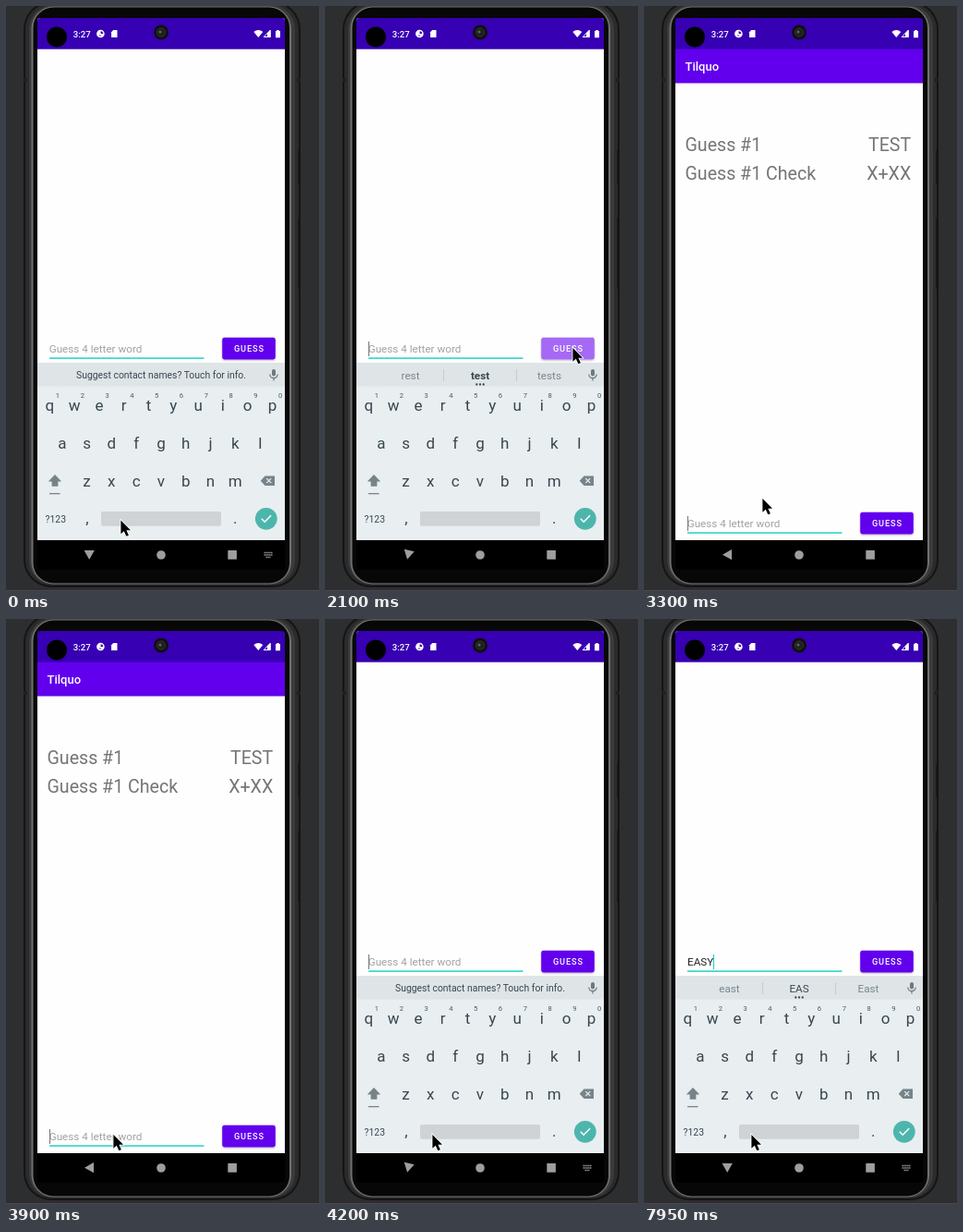
Recreate the animation shown at these times as an HTML page. Size 339 by 633 pixels, loop 8000 ms.

```html
<!DOCTYPE html>
<html lang="en">
<head>
<meta charset="utf-8">
<title>Word guessing game</title>
<style>
  html, body { margin: 0; width: 100%; height: 100%; overflow: hidden; background: #2d2e30; }
  svg { display: block; width: 339px; height: 633px; font-family: Roboto, "Noto Sans", sans-serif; }
  .mid { text-anchor: middle; }
  .key { font-size: 17px; fill: #37474f; text-anchor: middle; }
  .digit { font-size: 7.6px; fill: #455a64; text-anchor: middle; }
  .field { font-size: 11.7px; text-underline-offset: 1.6px; }
  .guess { font-size: 19.6px; fill: #757575; }
  .word { font-size: 11.7px; fill: #78868d; text-anchor: middle; }
</style>
</head>
<body>
<svg viewBox="0 0 339 633">
  <defs>
    <clipPath id="screen"><rect x="34" y="13" width="268" height="596.5" rx="3"/></clipPath>
    <filter id="shadow" x="-10%" y="-30%" width="120%" height="180%">
      <feDropShadow dx="0" dy=".9" stdDeviation=".8" flood-opacity=".3"/>
    </filter>
  </defs>

  <!-- phone body -->
  <rect width="339" height="633" fill="#2d2e30"/>
  <rect y="632" width="339" height="1" fill="#51434e"/>
  <rect x="19" y="-5" width="300" height="634" rx="30" fill="#151515"/>
  <rect x="21" y="-3" width="296" height="630" rx="28" fill="#2b2b2b"/>
  <rect x="25" y="-1" width="288" height="627" rx="26" fill="#3b3b3b"/>
  <rect x="27.5" y=".5" width="281.5" height="625" rx="24" fill="#707070"/>
  <rect x="29.5" y="1.5" width="277.5" height="623" rx="22" fill="#070707"/>
  <path d="M316.5 156h2.5v37h-2.5zM316.5 229h2.5v77h-2.5z" fill="#131313"/>
  <path d="M19 78h4v4h-4zM315 78h4v4h-4z" fill="#1f1f1f"/>

  <g clip-path="url(#screen)">
    <rect x="34" y="13" width="268" height="597" fill="#000"/>

    <g id="app">
      <rect x="34" y="47" width="268" height="531" fill="#fefefe"/>
      <rect x="34" y="46" width="268" height="37.5" fill="#6200ee"/>
      <text x="44.5" y="70" font-size="13" font-weight="500" fill="#fff">Tilquo</text>
      <g class="guess">
        <text x="44.5" y="156.5">Guess #1</text>
        <text x="289.2" y="156.5" text-anchor="end">TEST</text>
        <text x="44.5" y="188">Guess #1 Check</text>
        <text x="289.2" y="188" text-anchor="end">X+XX</text>
      </g>
      <text id="hint" class="field" x="46.7" y="564.3" fill="#a2a2a2">Guess 4 letter word</text>
      <text id="typed" class="field" x="47" y="564.3" fill="#222"></text>
      <rect id="caret" y="552" width="1" height="16"/>
      <rect x="47" y="569.4" width="167.5" height="1.4" fill="#14cfc2"/>
      <rect id="button" x="234.2" y="547.8" width="57.6" height="23.6" rx="2.4" filter="url(#shadow)"/>
      <text x="247" y="563.2" font-size="9.2" font-weight="500" letter-spacing=".85" fill="#fff">GUESS</text>
    </g>

    <!-- status bar -->
    <rect x="34" y="13" width="268" height="33.7" fill="#3700b3"/>
    <text x="72.7" y="33.5" font-size="9.6" font-weight="500" fill="#fff">3:27</text>
    <circle cx="102.4" cy="30" r="4.3" fill="#fff"/>
    <path d="M102.6 27.2a2.8 2.8 0 0 1 2.6 2.8h-2.6zM100.4 31.4h2.2v1.6z" fill="#3700b3"/>
    <path d="M116.2 26h4.3v8h-6.4v-5.8z" fill="#fff"/>
    <path d="M268.3 28q5-4 10 0l-5 6z" fill="#fff"/>
    <path d="M286.2 26.2v7.3h-7z" fill="none" stroke="#fff"/>
    <path d="M283 29.5l3.5-3.5v8H283z" fill="#fff"/>
    <path d="M292 27h1.3v-1h2.4v1h1.3v7.2h-5z" fill="#fff"/>

    <g id="keyboard">
      <rect x="34" y="386" width="268" height="192" fill="#e9eef1"/>
      <rect x="34" y="386" width="268" height="25.5" fill="#dfe4e7"/>
      <rect x="34" y="578" width="268" height="32" fill="#000"/>
      <text id="notice" class="mid" x="168" y="403.3" font-size="10.4" fill="#37474f">Suggest contact names? Touch for info.</text>
      <g id="words">
        <path d="M128.5 393v13M207.5 393v13" stroke="#c5ccd0"/>
        <text class="word" x="92.5" y="403.7"></text>
        <text class="word" x="168" y="403.7" style="fill:#37474f"></text>
        <text class="word" x="243" y="403.7"></text>
        <path d="M164.3 409.5h.01M168 409.5h.01M171.7 409.5h.01" stroke="#37474f" stroke-width="2.3" stroke-linecap="round"/>
      </g>
      <rect x="288" y="393" width="4" height="7.5" rx="2" fill="#6b7a81"/>
      <path d="M285.8 398.5a4.2 4.2 0 0 0 8.4 0M290 402.5v3" fill="none" stroke="#6b7a81" stroke-width="1.2"/>
      <g id="keys"></g>
      <path d="M53 507l7.2 7.5h-3.8v5.2h-6.8v-5.2h-3.8z" fill="#76848a"/>
      <rect x="47" y="527" width="11.5" height="1.3" fill="#76848a"/>
      <path d="M280.5 508.5h10.5v10.5h-10.5l-4.8-5.2z" fill="#76848a"/>
      <path d="M282.2 511.2l5 5m0-5l-5 5" stroke="#e9eef1" stroke-width="1.2"/>
      <text class="mid" x="53.8" y="558.7" font-size="10.4" fill="#37474f">?123</text>
      <rect x="103" y="547" width="130" height="15.7" rx="2" fill="#cfd3d5"/>
      <circle cx="281.8" cy="554.8" r="11.9" fill="#4db6ac"/>
      <path d="M276.8 554.8l3.4 3.4 6.9-6.9" fill="none" stroke="#fff" stroke-width="1.5"/>
    </g>

    <!-- navigation -->
    <g fill="#fff" fill-opacity=".62">
      <path id="back" d="M-5.6-4.8H5.6L0 5.2z"/>
      <circle cx="168" cy="594" r="4.8"/>
      <rect x="240.3" y="589" width="9.6" height="9.8" rx=".6"/>
      <path id="ime" d="M279.5 591.5h9M279.5 594h9M281.5 596.5h5" fill="none" stroke="#fff" stroke-opacity=".6" stroke-width="1.4" stroke-dasharray="1.4 .5"/>
    </g>
  </g>

  <circle cx="55" cy="33.5" r="11" fill="#000"/>
  <circle cx="168" cy="28.5" r="8" fill="#101012"/>
  <circle cx="168" cy="28.5" r="4.6" fill="#1d1f20" stroke="#34352f"/>
  <circle cx="167" cy="28" r="1.6" fill="#5a6158"/>

  <path id="mouse" d="M-.6 0V14.8L2.8 11.7 5.3 17.3 7.9 16.2 5.4 10.8H10z" fill="#000" stroke="#fff" stroke-width="1.6" paint-order="stroke"/>
</svg>
<script>
const LOOP = 8000;
const $ = id => document.getElementById(id);

function addKey(cls, x, y, label) {
  const node = document.createElementNS("http://www.w3.org/2000/svg", "text");
  node.setAttribute("class", cls);
  node.setAttribute("x", x);
  node.setAttribute("y", y);
  node.textContent = label;
  $("keys").append(node);
}
function addRow(cls, x, y, labels) {
  [...labels].forEach((label, i) => addKey(cls, x + 26.8 * i, y, label));
}
addRow("key", 47.3, 438, "qwertyuiop");
addRow("digit", 56, 423.5, "1234567890");
addRow("key", 60.8, 479, "asdfghjkl");
addRow("key", 87.5, 520, "zxcvbnm");
addKey("key", 88, 560, ",");
addKey("key", 248.3, 560, ".");

// pan: content shift; drop, fade: keyboard offset and opacity; turn: back arrow angle
const START = {
  text: "", caret: false, underline: false, words: null, bold: true,
  mouse: [125, 556.5], button: "#6200ee", pan: -189, drop: 0, fade: 1, turn: 0, ime: 1
};
// Each step keeps earlier values and overrides some of them.
const STEPS = [
  [450, { text: "t", caret: true, underline: true, words: ["to", "t", "the"] }],
  [600, { text: "te", words: ["the", "te", "ten"] }],
  [750, { text: "tes", words: ["yes", "tes", "test"] }],
  [900, { text: "test", words: ["rest", "test", "tests"] }],
  [1050, { mouse: [152, 540] }],
  [1200, { mouse: [226, 464] }],
  [1350, { mouse: [276, 407], caret: false }],
  [1500, { mouse: [273, 382] }],
  [1650, { mouse: [269, 370] }],
  [1950, { button: "#8d48f2" }],
  [2100, { text: "", caret: true, button: "#a569f5", turn: 12, ime: 0 }],
  [2250, { button: "#8d48f2", pan: -60, drop: 110, fade: .6, turn: 75 }],
  [2400, { caret: false, button: "#6200ee", pan: 0, drop: 230, fade: 0, turn: 90, words: null }],
  [3000, { caret: true, mouse: [279, 392] }],
  [3150, { mouse: [205, 480] }],
  [3300, { mouse: [129, 533] }],
  [3450, { mouse: [118, 572] }],
  [3600, { caret: false, mouse: [117, 578] }],
  [3750, { mouse: [117, 566] }],
  [3900, { caret: true, mouse: [117, 558] }],
  [4050, { pan: -151, drop: 51.5, fade: .845, ime: .4 }],
  [4200, { pan: -189, drop: 0, fade: 1, turn: 12, ime: 1 }],
  [4350, { turn: 0 }],
  [4500, { caret: false }],
  [4950, { caret: true }],
  [5400, { caret: false }],
  [5550, { text: "E", caret: true, underline: true, words: ["He", "E", "We"] }],
  [6000, { caret: false }],
  [6450, { caret: true }],
  [6900, { caret: false }],
  [7200, { text: "EA", caret: true, underline: false }],
  [7500, { text: "EAS", underline: true, words: ["east", "EAS", "East"], bold: false }],
  [7950, { text: "EASY", underline: false }]
];

const show = (node, on) => node.setAttribute("visibility", on ? "visible" : "hidden");
const move = (node, x, y, more = "") => node.setAttribute("transform", `translate(${x} ${y}) ${more}`);

function render(time) {
  const s = Object.assign({}, START, ...STEPS.filter(([at]) => at <= time).map(([, change]) => change));
  move($("app"), 0, s.pan);
  move($("keyboard"), 0, s.drop);
  $("keyboard").setAttribute("opacity", s.fade);
  move($("back"), 90.2, 593.7, `rotate(${s.turn})`);
  $("ime").setAttribute("opacity", s.ime);
  move($("mouse"), ...s.mouse);
  $("button").setAttribute("fill", s.button);

  const typed = $("typed");
  typed.textContent = s.text;
  typed.setAttribute("text-decoration", s.underline ? "underline" : "none");
  show($("hint"), !s.text);
  show($("caret"), s.caret);
  $("caret").setAttribute("x", 47 + (s.text ? Math.round(typed.getComputedTextLength()) : 0));
  $("caret").setAttribute("fill", s.text ? "#14cfc2" : "#777");

  show($("notice"), !s.words);
  show($("words"), s.words);
  const labels = $("words").querySelectorAll("text");
  labels.forEach((label, i) => { label.textContent = s.words ? s.words[i] : ""; });
  labels[1].setAttribute("font-weight", s.bold ? 700 : 400);
}

const begin = performance.now();
function tick() {
  render((performance.now() - begin) % LOOP);
  requestAnimationFrame(tick);
}
tick();
</script>
</body>
</html>
```
